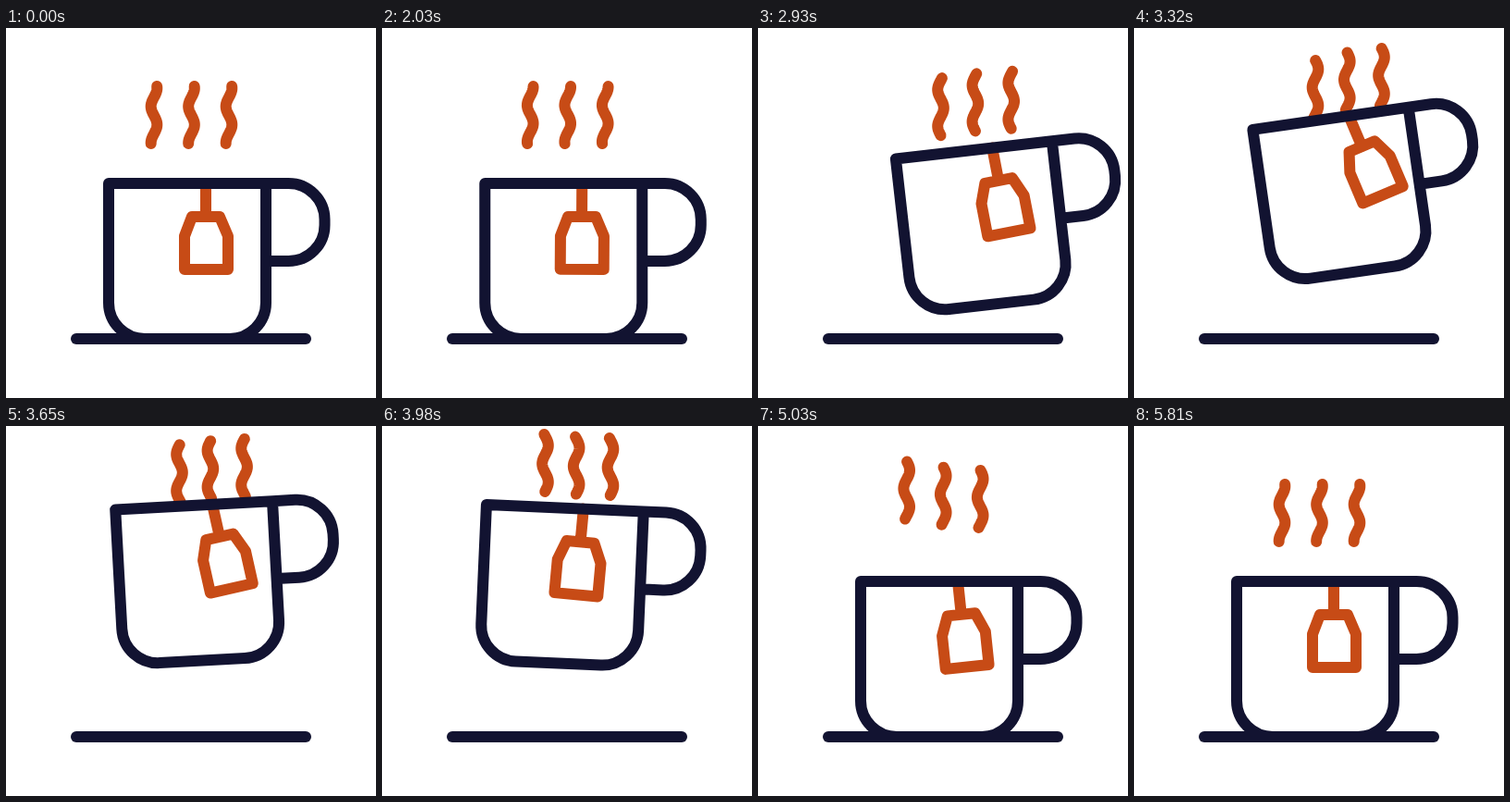
An HTML page with a canvas that plays this animation: 400x400 px, repeating every 5840 ms.

```html
<!DOCTYPE html>
<html lang="en">
<head>
<meta charset="utf-8">
<title>Tea cup</title>
<style>
  html, body { margin: 0; width: 100%; height: 100%; overflow: hidden; background: #fff; }
  canvas { display: block; width: 400px; height: 400px; }
</style>
</head>
<body>
<canvas id="stage" width="400" height="400"></canvas>
<script>
const LOOP = 5840, START = 2000, DARK = '#121331', ORANGE = '#c74b16';
const ctx = document.getElementById('stage').getContext('2d');

// A motion runs smoothly from rest at START through a few poses back to rest at `end`.
function motion(end, ...poses) {
  const rest = poses[0].slice(1).fill(0);
  return [[START, ...rest], ...poses, [end, ...rest]];
}

const cupMotion = motion(5000, // dx, dy, degrees
  [2570, 42, -10, -2.1], [2900, 47.5, -34, -6.2], [3320, 28.5, -71, -8.2],
  [3980, -1.8, -79.4, 2.5], [4520, -3.1, -18.7, 5.9]);
const tagMotion = motion(5810, // degrees
  [2300, 12], [2570, 6], [3320, -23], [3980, 5.2], [4520, 31], [5100, -9], [5500, 3]);
const steamMotion = motion(5600, // dx, dy of the left strand, then of the right one
  [2570, 32, 5, 31.5, 5], [3320, 36, -28, 26.5, -41],
  [3980, 16.5, -54, 6, -50], [4520, 4, -54, -0.5, -36]);

const clamp = (v, low, high) => Math.min(Math.max(v, low), high);
const mix = (a, b, k) => a + (b - a) * k;

function slope(keys, i, c) {
  const a = keys[i - 1], b = keys[i + 1];
  return a && b ? (b[c] - a[c]) / (b[0] - a[0]) : 0;
}

function sample(keys, time) {
  const last = keys.length - 1, t = clamp(time, START, keys[last][0]);
  let i = 0;
  while (t > keys[i + 1][0]) i++;
  const a = keys[i], b = keys[i + 1], h = b[0] - a[0], u = (t - a[0]) / h, v = 1 - u;
  return a.slice(1).map((p, n) => {
    const c = n + 1;
    return p * v * v * (1 + 2 * u) + b[c] * u * u * (3 - 2 * u)
      + h * u * v * (v * slope(keys, i, c) - u * slope(keys, i + 1, c));
  });
}

function stroke(color, path) {
  ctx.strokeStyle = color;
  ctx.beginPath();
  path();
  ctx.stroke();
}

const polyline = points => points.forEach(([x, y]) => ctx.lineTo(x, y));

function turn(x, y, degrees) {
  ctx.translate(x, y);
  ctx.rotate(degrees * Math.PI / 180);
}

// Four waves rise through each strand, slowing to a stop.
function drawSteam(t) {
  const u = clamp((t - START) / 3600, 0, 1), cycles = 4 * (u + u * u - u ** 3);
  const [leftX, leftY, rightX, rightY] = sample(steamMotion, t);
  [0, 0.65, 1].forEach((k, i) => {
    const x = 160 + 40.5 * i + mix(leftX, rightX, k), y = 63 + mix(leftY, rightY, k);
    stroke(ORANGE, () => {
      for (let s = 0; s <= 62; s++) {
        ctx.lineTo(x + 3.3 * Math.cos(2 * Math.PI * ((s - 2) / 39.5 + cycles)), y + s);
      }
    });
  });
}

function drawTag(angle) {
  ctx.save();
  turn(20, -84, angle);
  stroke(ORANGE, () => {
    ctx.moveTo(0, 0);
    ctx.lineTo(0, 36);
    ctx.moveTo(-15, 36);
    polyline([[15, 36], [24, 57], [24, 93], [-23, 93], [-23, 57]]);
    ctx.closePath();
  });
  ctx.restore();
}

// Coordinates are relative to the centre of the cup body.
function drawCup(t) {
  const [dx, dy, angle] = sample(cupMotion, t), [tagAngle] = sample(tagMotion, t);
  ctx.save();
  turn(196 + dx, 252 + dy, angle);
  drawTag(tagAngle - angle);
  stroke(DARK, () => {
    ctx.moveTo(85, -84);
    ctx.lineTo(-85, -84);
    ctx.arcTo(-85, 84, 0, 84, 39);
    ctx.arcTo(85, 84, 85, 0, 39);
    ctx.lineTo(85, -84);
    ctx.arcTo(148.5, -84, 148.5, 0, 39);
    ctx.arcTo(148.5, 0, 85, 0, 39);
    ctx.lineTo(85, 0);
  });
  ctx.restore();
}

function draw(now) {
  const t = now % LOOP;
  ctx.clearRect(0, 0, 400, 400);
  ctx.lineWidth = 12;
  ctx.lineCap = ctx.lineJoin = 'round';
  drawSteam(t);
  drawCup(t);
  stroke(DARK, () => polyline([[76, 336], [324, 336]]));
  requestAnimationFrame(draw);
}
draw(0);
</script>
</body>
</html>
```
